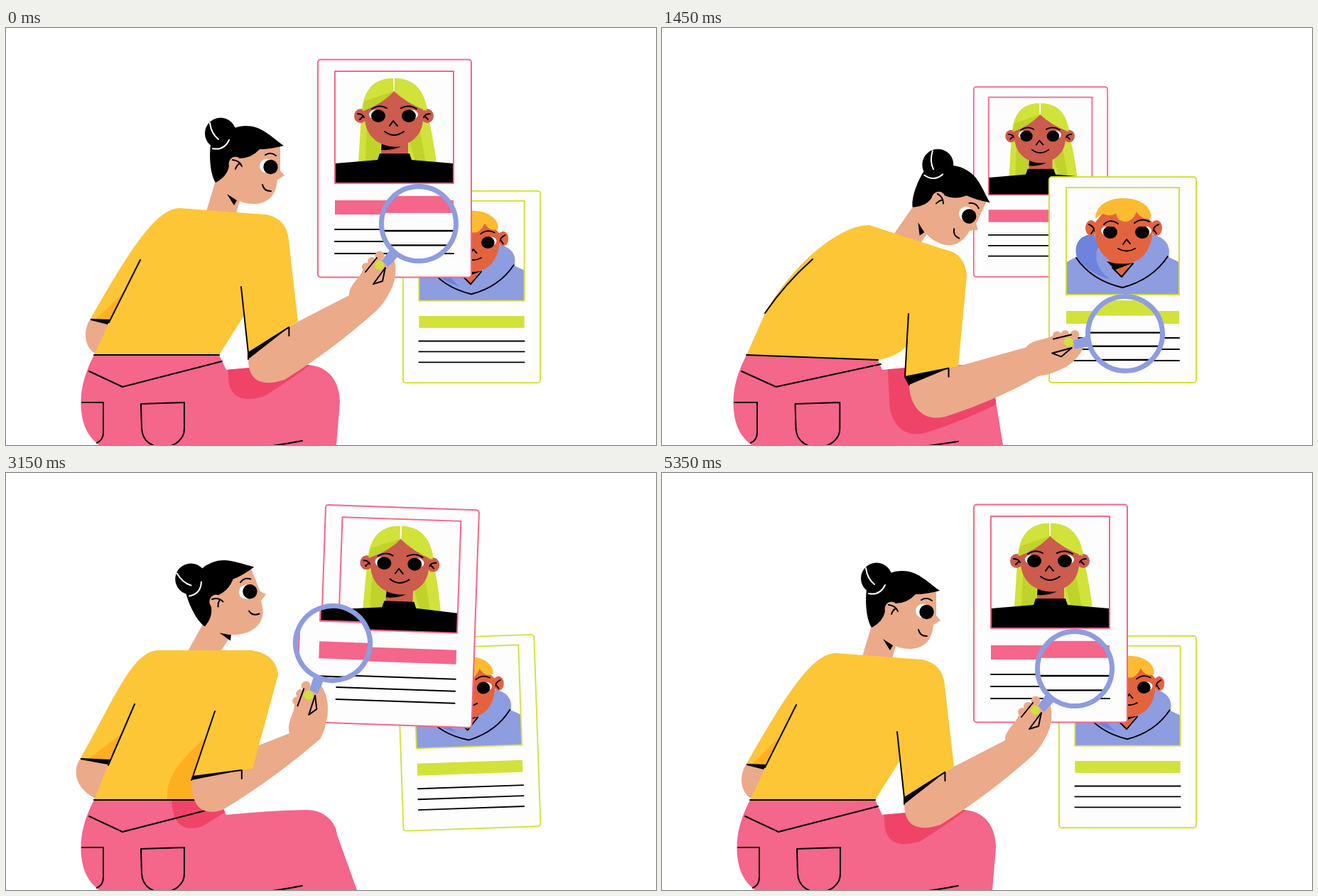
Recreate the animation shown at these times as an HTML page with a canvas. Size 915 by 588 pixels, loop 5400 ms.

```html
<!DOCTYPE html>
<html lang="en">
<head>
<meta charset="utf-8">
<title>Reviewing profiles</title>
<style>
html, body { margin: 0; width: 100%; height: 100%; overflow: hidden; background: #fff; }
canvas { display: block; }
</style>
</head>
<body>
<canvas id="stage" width="915" height="588"></canvas>
<script>
const ctx = document.getElementById('stage').getContext('2d');
const LOOP = 5400, STEP = 50;
const C = {
  skin: '#ebaa8a', yellow: '#fcc636', orange: '#fcb021', pink: '#f4668a', red: '#ef4468',
  blue: '#8e9ce0', navy: '#6e83dc', lime: '#d1e23a', olive: '#bfd32a',
  brown: '#cb5c4e', rust: '#e4633f', blond: '#fcbb30', paper: '#fdfdfd', ink: '#000'
};

// ---- tracks: monotone cubic curves through [time, value] keys
const slope = (k, i) => (k[i + 1][1] - k[i][1]) / (k[i + 1][0] - k[i][0]);
function tangent(k, i) {
  if (i < 1 || i > k.length - 2) return 0;
  const a = slope(k, i - 1), b = slope(k, i);
  return a * b <= 0 ? 0 : 2 * a * b / (a + b);
}
function track(k, t) {
  let i = 0;
  while (i < k.length - 2 && k[i + 1][0] <= t) i++;
  const h = k[i + 1][0] - k[i][0], u = Math.min(1, (t - k[i][0]) / h), v = 1 - u;
  return k[i][1] * (1 + 2 * u) * v * v + tangent(k, i) * h * u * v * v
    + k[i + 1][1] * u * u * (3 - 2 * u) - tangent(k, i + 1) * h * u * u * v;
}

// ---- poses of the woman; head and lens are x, y, degrees
const rest = {
  head: [323, 192, 0], neckL: [245, 254], cuffL: [119, 410], cuffR: [145, 416],
  waistL: [124, 461], waistR: [300, 461], pit: [334, 407], sh1: [365, 263], sh2: [398, 300],
  out: [411, 414], inn: [341, 458], arm: [341, 467], elbow: [392, 496], seam: [331, 365],
  back1: [189, 327], back2: [145, 415], lens: [581, 276, 0], knee: [470, 528],
  shin: [465], side: [1], lid: [0], ooh: [0], fold: [0], hem: [375, 582]
};
const reach = {
  head: [359.5, 217, 3.5], neckL: [275, 267], cuffL: [138, 416], cuffR: [137, 419],
  waistL: [121, 461], waistR: [303, 466], pit: [328, 446], sh1: [385, 290], sh2: [417, 328],
  out: [403, 457], inn: [330, 473], arm: [328, 484], elbow: [385, 522], seam: [335, 384],
  back1: [202, 326], back2: [146, 407], lens: [613, 365, 21], knee: [469, 515],
  shin: [468], side: [0], lid: [0], ooh: [0], fold: [.1], hem: [358, 574]
};
const lean = {
  head: [389, 241, 25], neckL: [292, 278], cuffL: [145, 402], cuffR: [143, 407],
  waistL: [119, 461], waistR: [304, 468], pit: [344, 449], sh1: [400, 313], sh2: [429, 350],
  out: [417, 477], inn: [342, 492], arm: [348, 503], elbow: [402, 547], seam: [347, 403],
  back1: [212, 326], back2: [145, 402], lens: [652, 431, 38], knee: [468, 515],
  shin: [480], side: [0], lid: [0], ooh: [0], fold: [0], hem: [375, 583]
};
const amazed = {
  head: [397, 247, 18], neckL: [298, 283], cuffL: [150, 402], cuffR: [147, 407],
  waistL: [119, 461], waistR: [304, 469], pit: [367, 437], sh1: [405, 322], sh2: [436, 355],
  out: [450, 474], inn: [383, 509], arm: [392, 514], elbow: [440, 553], seam: [364, 421],
  back1: [217, 330], back2: [150, 402], lens: [701, 440, 38], knee: [475, 535],
  shin: [494], side: [0], lid: [0], ooh: [1], fold: [0], hem: [375, 582]
};
const upright = {
  head: [296, 182, -22], neckL: [215, 250], cuffL: [105, 402], cuffR: [145, 409],
  waistL: [124, 461], waistR: [300, 461], pit: [290, 400], sh1: [345, 250], sh2: [383, 285],
  out: [347, 417], inn: [263, 428], arm: [261, 433], elbow: [305, 475], seam: [294, 336],
  back1: [181, 326], back2: [144, 412], lens: [460, 240, -18.5], knee: [466, 510],
  shin: [494], side: [1], lid: [0], ooh: [0], fold: [1], hem: [375, 582]
};
const squint = {
  head: [343, 204, 13], neckL: [255, 260], cuffL: [128, 413], cuffR: [148, 417],
  waistL: [126, 461], waistR: [304, 466], pit: [334, 421], sh1: [370, 271], sh2: [405, 305],
  out: [411, 430], inn: [340, 457], arm: [351, 463], elbow: [402, 505], seam: [329, 368],
  back1: [196, 328], back2: [148, 411], lens: [582, 272, 0], knee: [470, 525],
  shin: [469], side: [.8], lid: [1], ooh: [0], fold: [0], hem: [375, 581]
};
const acts = [[0, rest], [650, reach], [1450, lean], [2200, amazed], [3150, upright],
  [3300, upright], [4000, squint], [5350, rest], [LOOP, rest]];

function poseAt(t) {
  const p = {};
  for (const name in rest)
    p[name] = rest[name].map((_, j) => track(acts.map(([at, pose]) => [at, pose[name][j]]), t));
  return p;
}

const pull = [[0, 0], [80, 0], [400, 1], [650, .15], [780, 0], [2350, 0], [2800, 1], [3150, -.09], [3320, 0], [LOOP, 0]];
const tilt = [[0, 0], [80, 0], [400, 1], [650, .21], [780, 0], [2350, 0], [2800, 1], [3150, -.22], [3320, 0], [LOOP, 0]];
const swap = [[0, 0], [100, 0], [600, 1], [2350, 1], [3050, 0], [LOOP, 0]];
const girlTurn = [[0, 0], [3350, 0], [3900, 1], [4300, 1], [5100, 0], [LOOP, 0]];
const boyTurn = [[0, 0], [800, 0], [1350, 1], [1650, 1], [2150, -.6], [2600, 0], [LOOP, 0]];

// ---- drawing helpers
const mix = (a, b, u) => a + (b - a) * u;
const mid = (p, q, u) => [mix(p[0], q[0], u), mix(p[1], q[1], u)];
const add = (p, x, y) => [p[0] + x, p[1] + y];
const rad = d => d * Math.PI / 180;
const turn = ([x, y], [ox, oy], [nx, ny, deg]) => {
  const c = Math.cos(rad(deg)), s = Math.sin(rad(deg));
  return [nx + (x - ox) * c - (y - oy) * s, ny + (x - ox) * s + (y - oy) * c];
};
function fill(d, color) { ctx.fillStyle = color; ctx.fill(new Path2D(d)); }
function line(d, color = C.ink, w = 2) {
  ctx.strokeStyle = color; ctx.lineWidth = w; ctx.stroke(new Path2D(d));
}
function dot(x, y, rx, color, ry = rx) {
  ctx.fillStyle = color; ctx.beginPath(); ctx.ellipse(x, y, rx, ry, 0, 0, 7); ctx.fill();
}
function group(draw) { ctx.save(); draw(); ctx.restore(); }
function place([x, y, deg], [ox, oy], scale = 1) {
  ctx.translate(x, y); ctx.rotate(rad(deg)); ctx.scale(scale, scale); ctx.translate(-ox, -oy);
}

// ---- cards
function sheet(x, y, w, h, color, frame, bar, rows, face) {
  ctx.fillStyle = C.paper; ctx.strokeStyle = color; ctx.lineWidth = 2;
  ctx.beginPath(); ctx.roundRect(x, y, w, h, 4); ctx.fill(); ctx.stroke();
  face();
  ctx.strokeStyle = color; ctx.lineWidth = 2; ctx.strokeRect(...frame);
  ctx.fillStyle = color; ctx.fillRect(frame[0], bar[0], frame[2], bar[1]);
  rows.forEach(r => line(`M${frame[0]} ${r}h${frame[2]}`));
}
function openEye(x, y, side, lid) {
  group(() => {
    ctx.beginPath(); ctx.rect(x - 20, y - 11 + lid * 6, 40, 30); ctx.clip();
    dot(x + side * 5, y - 2, 8, '#fff', 6.5);
    dot(x, y, 10, C.ink, 9);
  });
}
function girl(turned) {
  const s = -5 * turned;
  fill(`M546 71C512 70 502 95 500 125L496 190H606C603 165 598 140 595 128C592 95 580 70 546 71Z`, C.lime);
  fill('M508 140L506 190H527V150ZM566 155L577 190H591L582 140Z', C.olive);
  fill('M528 155H566V188H528Z', C.brown);
  fill('M529 163Q542 169 556 167Q545 173 528 172Z', C.ink);
  dot(499 + 5 * turned, 124, 9 - 2 * turned, C.brown, 10);
  dot(593 + s, 124, 9, C.brown, 10);
  line(`M${495 + 5 * turned} 121q7 0 9 5m-6 3l5 -5M${597 + s} 121q-7 0 -9 5m6 3l-5 -5`);
  fill(`M${505 + s / 2} 112V128C${506 + s / 2} 152 525 167 ${546 + s} 167C567 167 ${587 + s} 152 ${587 + s} 128V112L546 84Z`, C.brown);
  fill(`M546 71C512 70 501 98 502 117Q530 107 ${546 + s} 89Q564 106 592 117C591 98 580 70 546 71Z`, C.lime);
  fill(`M${546 + s} 89L505 103L502 117Q528 108 ${546 + s} 89Z`, C.olive);
  line(`M546 71L${546 + s} 88`, '#fff');
  group(() => {
    ctx.translate(s * 1.3, 0);
    openEye(524, 124, -1, turned);
    openEye(567, 124, 1, turned);
    line('M515 114Q526 107 536 113M556 113Q567 107 578 114M540 138L545 131L551 138M533 146Q546 156 560 146');
  });
  fill('M526 177H568L571 186L630 191V219H463V191L523 186Z', C.ink);
}
function boy(turned) {
  fill('M569 376V331Q577 325 584 323C579 303 590 291 607 291H690C709 295 717 308 713 323L728 330V376Z', C.blue);
  fill('M584 323C579 303 590 291 607 291L620 318Q618 340 630 354Q600 346 584 323Z', C.navy);
  fill('M613 310Q606 335 628 352L648 366L690 340V310Z', C.blue);
  fill('M628 326L647 351L664 326Z', C.rust);
  fill('M626 329Q645 335 664 331Q650 336 638 341Z', C.ink);
  line('M634 338L647 351L663 332M583 324Q605 356 648 366Q690 355 712 322');
  group(() => {
    place([651, 290, turned < 0 ? -turned * 5 : 0], [651, 290]);
    dot(604, 282, 8, C.rust, 11); dot(696, 282, 8, C.rust, 11);
    line('M601 277q7 3 8 9m-5 4l4 -6M699 277q-7 3 -8 9m5 4l-4 -6');
    fill('M609 275C607 312 625 332 650 332C676 332 692 312 691 275L670 252H628Z', C.rust);
    fill('M610 269C610 250 628 240 650 240C676 240 691 255 688 268Q676 272 668 259Q662 274 651 273Q641 272 639 261Q632 267 621 262Q615 264 610 269Z', C.blond);
    ctx.translate(3 * turned, 0);
    openEye(628, 288, -1, Math.max(0, turned) * .5);
    openEye(673, 288, 1, Math.max(0, turned) * .5);
    line('M619 277Q628 268 639 276M662 275Q672 267 683 273M646 305L651 298L656 304M639 311Q651 318 663 311');
  });
}
function cardsAt(t) {
  const k = track(pull, t), r = 9 * track(tilt, t), f = track(swap, t);
  const pink = {
    at: [mix(547, 533, f) - 64 * k, mix(198, 217, f) - 44 * k, -r],
    mid: [547, 198], scale: mix(1, .872, f), zoom: [592, 274],
    draw: () => sheet(439, 44.5, 216, 307, C.pink, [463, 61, 167, 158], [243, 20], [284, 301, 318], () => girl(track(girlTurn, t)))
  };
  const green = {
    at: [mix(655.5, 648.5, f) + 46 * k, mix(365, 355, f) - 14 * k, r],
    mid: [648.5, 355], scale: mix(.933, 1, f), zoom: [635, 474],
    draw: () => sheet(545, 210, 207, 290, C.lime, [569, 225, 159, 151], [399, 18], [437, 453, 469], () => boy(track(boyTurn, t)))
  };
  return t >= 400 && t < 2800 ? [pink, green] : [green, pink];
}
function drawCard(c) {
  group(() => { place(c.at, c.mid, c.scale); c.draw(); });
}

// ---- woman
const HEAD = [323, 192], LENS = [581, 276];

function head(p) {
  const lid = p.lid[0], ooh = p.ooh[0];
  place(p.head, HEAD);
  fill('M300 180L297 216L318 238Q333 249 352 248C368 246 380 238 382 214L392 208L386 201L386 165L345 150Z', C.skin);
  fill('M295 218C287 205 286 180 288 165L308 150Q320 138 337 138C360 138 370 151 391 166Q372 171 357 171Q345 184 328 184L314 194Q312 209 295 218Z', C.ink);
  dot(302, 148.5, 22, C.ink);
  line('M287 134Q289 149 299 157M291 170Q307 173 314 158', '#fff');
  dot(323, 192, 9.5, C.skin, 10.5);
  line('M319 186Q329 187 332 195M323 199Q325 193 329 191');
  group(() => {
    ctx.beginPath();
    ctx.moveTo(350, 183 + lid * 4); ctx.lineTo(390, 183 + lid * 11);
    ctx.lineTo(390, 215); ctx.lineTo(350, 215); ctx.clip();
    dot(367, 194.5, 10 + ooh, '#fff', 10 + ooh);
    dot(372.5, 196, 10.2, C.ink);
  });
  line('M365 179Q373 174 380 180');
  if (ooh > .4) dot(368, 228, 6 * ooh, C.ink, 5 * ooh);
  else line('M361 221Q363 230 373 230');
}
function neck(p) {
  const a = turn([296, 212], HEAD, p.head), b = turn([330, 240], HEAD, p.head);
  const l = add(mid(p.neckL, p.sh1, .3), 0, 5), r = add(mid(p.neckL, p.sh1, .65), 0, 5);
  fill(`M${a}L${b}L${r}L${l}Z`, C.skin);
  const [s, u, v] = [[311, 234], [325, 243], [321, 250]].map(q => turn(q, HEAD, p.head));
  fill(`M${s}L${u}L${v}Z`, C.ink);
}
function armPath(p, start = p.inn) {
  // the two middle points reach into the palm so no gap shows at the wrist
  const [low, in1, in2, top] = [[522, 398], [530, 380], [497, 358], [483, 377]].map(q => turn(q, LENS, p.lens));
  const under = add(mid(p.elbow, low, .5), 4, 6), over = mid(p.out, p.sh2, .25 * p.fold[0]);
  return `M${start}L${p.arm}C${add(p.arm, 0, 26)} ${add(p.elbow, -37, 12)} ${p.elbow}Q${under} ${low}L${in1}L${in2}L${top}L${over}Z`;
}
function leftArm(p) {
  const s = p.side[0];
  if (s < .02) return;
  fill(`M${p.cuffL}C${add(p.cuffL, -12 * s, 17 * s)} ${add(p.cuffL, -9 * s, 44)} ${add(p.waistL, 6, 0)}L${p.cuffR}Z`, C.skin);
}
function pants(p) {
  const d = p.waistL[0] - 124, [kx, ky] = p.knee, wr = p.waistR;
  const shape = new Path2D(`M${p.waistL}C${108 + d} 492 ${104 + d} 515 ${106 + d} 540Q${109 + d} 572 ${131 + d} 588H${p.shin[0]}L${kx} ${ky}C${kx} 500 455 475 422 475Q370 476 310 482L${wr}Z`);
  ctx.fillStyle = C.pink; ctx.fill(shape);
  group(() => {
    ctx.clip(shape);
    ctx.translate(-28, 23);
    fill(armPath(p, mid(p.inn, p.seam, .6)), C.red);
  });
  line(`M${117 + d} 484L${164 + d * .7} 506L${wr[0] + 4} ${Math.max(470, wr[1] + 6)}`);
  line(`M${107 + d} 528H${137 + d * .6}V570Q${137 + d * .6} 581 ${128 + d * .6} 585`);
  const e = d * .5;
  line(`M${190 + e} 530L${251 + e * .3} 528V565C${251 + e * .3} 597 ${193 + e} 602 ${191 + e} 565Z`);
  line(`M${p.hem[0]} 589Q${p.hem[0] + 22} 586 417 ${p.hem[1]}`);
}
function torso(p) {
  const { neckL, cuffL, cuffR, waistL, waistR, pit, sh1, sh2, seam, inn } = p;
  const s = p.side[0], fold = p.fold[0], bend = 1 - s;
  const shape = new Path2D(`M${neckL}C${add(neckL, -37, -1)} ${add(cuffL, 45, -78)} ${cuffL}L${cuffR}L${waistL}L${waistR}Q${add(mid(waistR, pit, .5), 6 * bend, 5 * bend)} ${pit}L${sh2}Q${sh2[0] - 3} ${sh1[1] + 5} ${sh1}Z`);
  ctx.fillStyle = C.yellow; ctx.fill(shape);
  if (fold > .02) group(() => {
    ctx.clip(shape);
    fill(`M${mid(seam, inn, .4)}Q${add(inn, -34 * fold, -12)} ${add(inn, -36 * fold, 22)}V461H${inn[0] + 15}L${inn}Z`, C.orange);
  });
  if (s > .02) {
    const top = mid(cuffR, p.back1, .2 + .3 * s);
    fill(`M${top}L${mid(cuffR, cuffL, .75 * s)}L${cuffR}Z`, C.orange);
    fill(`M${cuffL}L${add(cuffR, 2, -5 * s)}L${add(cuffR, -2, 2 * s)}L${add(cuffL, 0, 2)}Z`, C.ink);
  }
  line(`M${p.back1}Q${add(mid(p.back1, p.back2, .5), -5 * bend, -4 * bend)} ${p.back2}`);
  line(`M${waistL}L${waistR}`);
  fill(armPath(p), C.skin);
  fill(`M${seam}L${inn}L${p.out}L${sh2}Q${sh2[0] - 3} ${sh1[1] + 5} ${sh1}Z`, C.yellow);
  const tick = mid(inn, p.out, .82);
  fill(`M${inn}L${p.arm}L${tick}Z`, C.ink);
  line(`M${seam}L${inn}L${p.arm}M${inn}L${tick}l0 12`);
}
function glass(p, cards) {
  const [x, y] = p.lens;
  group(() => {
    ctx.beginPath(); ctx.arc(x, y, 50, 0, 7); ctx.clip();
    ctx.fillStyle = C.paper; ctx.fillRect(x - 60, y - 60, 120, 120);
    cards.forEach(c => group(() => {
      const off = [c.zoom[0] - c.mid[0], c.zoom[1] - c.mid[1]];
      const at = [c.at[0] + off[0] * c.scale, c.at[1] + off[1] * c.scale, 0];
      place(at, at, 1.2);
      drawCard(c);
    }));
  });
  group(() => {
    place(p.lens, LENS);
    fill('M483 377C483 361 500 352 503 339L516 324L534 328L546 325C552 345 546 365 537 378Q532 388 522 398Z', C.skin);
    dot(507, 337, 6, C.skin); dot(515, 329, 6, C.skin); dot(526, 321, 6.5, C.skin);
    fill('M540 313L551 323L538 337L529 328Z', C.blue);
    ctx.strokeStyle = C.blue; ctx.lineWidth = 7;
    ctx.beginPath(); ctx.arc(...LENS, 52.5, 0, 7); ctx.stroke();
    line('M522 324L506 344M534 338L517 361L530 357Z');
    dot(525.5, 334.5, 6.5, C.lime);
  });
}

function render(t) {
  ctx.fillStyle = '#fff';
  ctx.fillRect(0, 0, 915, 588);
  ctx.lineCap = ctx.lineJoin = 'round';
  const p = poseAt(t), cards = cardsAt(t);
  cards.forEach(drawCard);
  neck(p);
  leftArm(p);
  pants(p);
  torso(p);
  group(() => head(p));
  glass(p, cards);
}
function loop() {
  render(Math.floor(performance.now() % LOOP / STEP) * STEP);
  requestAnimationFrame(loop);
}
loop();
</script>
</body>
</html>
```
